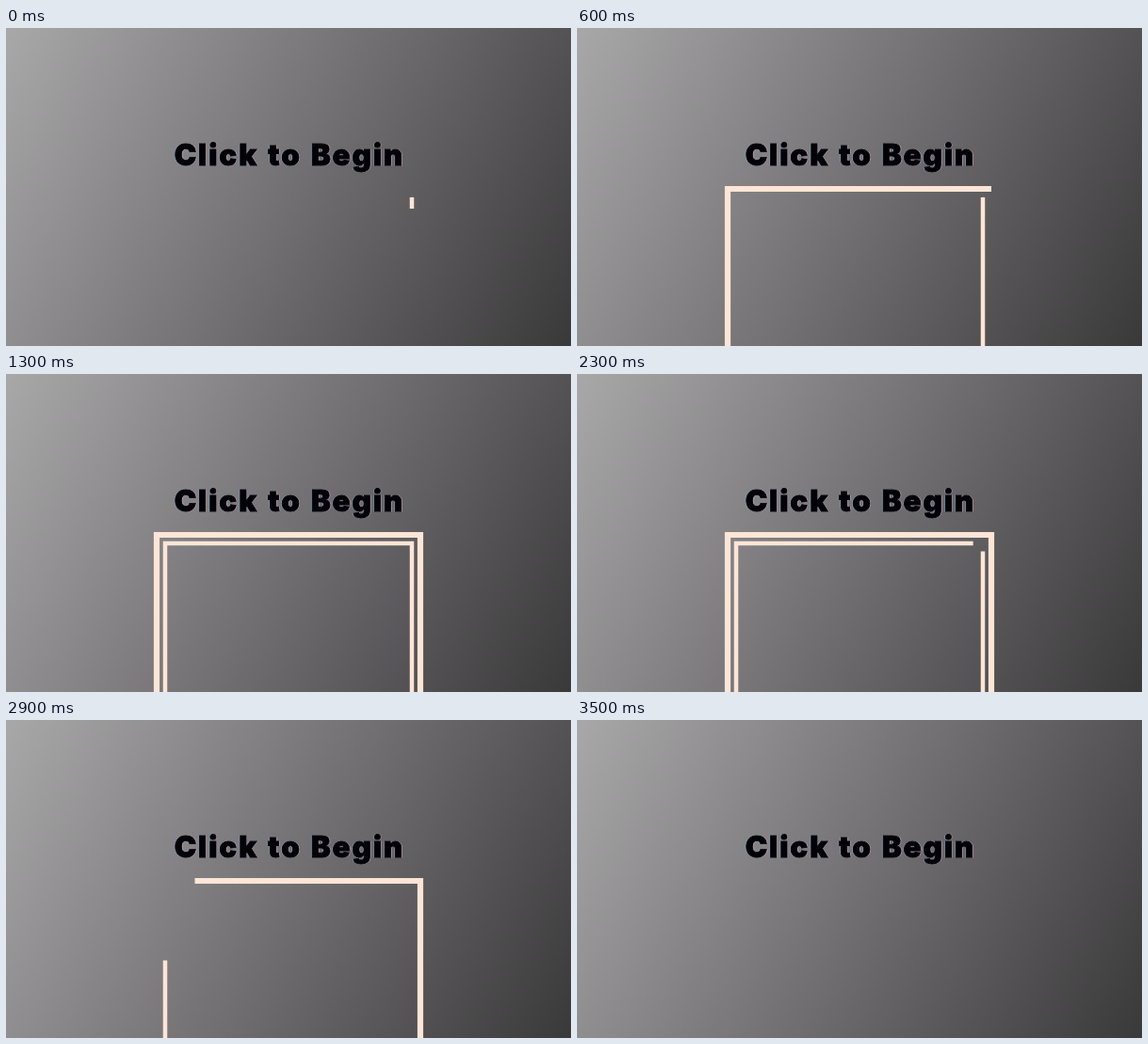
Recreate the animation shown at these times as an HTML page with a canvas. Size 600 by 338 pixels, loop 3800 ms.

```html
<!DOCTYPE html>
<html lang="en">
<head>
<meta charset="utf-8">
<title>Click to Begin</title>
<style>
  html, body { margin: 0; width: 100%; height: 100%; overflow: hidden; background: #666; }
  canvas { display: block; width: 100vw; height: 100vh; }
</style>
</head>
<body>
<canvas id="stage" width="600" height="338"></canvas>
<script>
const W = 600, H = 338, LOOP = 3800, STEP = 100;
const ctx = document.getElementById('stage').getContext('2d');

const sky = ctx.createLinearGradient(0, 0, 609, 324);
sky.addColorStop(0, '#a9a8a9');
sky.addColorStop(0.5, '#727072');
sky.addColorStop(1, '#3a393a');

// Each frame grows along its outline, then shrinks from both ends.
// tail and head are the distances the two ends travel while shrinking.
const outer = {
  pts: [[160, 356], [160, 171], [440, 171], [440, 356]],
  width: 6.2, tail: 478, head: 452,
  grow: [-80, 1360], shrink: [2430, 975]
};
const inner = {
  pts: [[431, 180], [431, 393], [169, 393], [169, 180]],
  width: 4.5, tail: 358, head: 430,
  grow: [-98, 1368], shrink: [2200, 1010]
};

function ease(t, [start, span]) {
  const u = Math.min(1, Math.max(0, (t - start) / span));
  return (1 - Math.cos(Math.PI * u)) / 2;
}

function perimeter(pts) {
  return pts.reduce((sum, [x, y], i) => {
    const [nx, ny] = pts[(i + 1) % pts.length];
    return sum + Math.hypot(nx - x, ny - y);
  }, 0);
}

function drawFrame(f, t) {
  const total = perimeter(f.pts);
  const gone = ease(t, f.shrink);
  if (gone >= 1) return;
  const from = f.tail * gone;
  const to = total * ease(t, f.grow) - f.head * gone;
  if (to <= from) return;

  ctx.beginPath();
  f.pts.forEach(([x, y]) => ctx.lineTo(x, y));
  ctx.closePath();
  ctx.lineWidth = f.width;
  ctx.strokeStyle = '#fee5d6';
  const whole = to - from >= total - 0.01;
  ctx.setLineDash(whole ? [] : [to - from, total * 2]);
  ctx.lineDashOffset = -from;
  ctx.stroke();
  ctx.setLineDash([]);
}

function drawTitle() {
  ctx.font = '900 31.5px Inter, "Liberation Sans", sans-serif';
  ctx.letterSpacing = '1.8px';
  ctx.wordSpacing = '2px';
  ctx.textAlign = 'center';
  ctx.lineWidth = 0.8;
  const put = (dx, color) => {
    ctx.fillStyle = ctx.strokeStyle = color;
    ctx.fillText('Click to Begin', 300.9 + dx, 146);
    ctx.strokeText('Click to Begin', 300.9 + dx, 146);
  };
  put(-0.9, 'rgba(125, 170, 195, 0.5)');
  put(0.9, 'rgba(205, 165, 190, 0.5)');
  put(0, '#030207');
}

function render(now) {
  const t = Math.floor((now % LOOP) / STEP) * STEP;
  ctx.fillStyle = sky;
  ctx.fillRect(0, 0, W, H);
  drawFrame(outer, t);
  drawFrame(inner, t);
  drawTitle();
}

let start;
function tick(now) {
  if (start === undefined) start = now;
  render(now - start);
  requestAnimationFrame(tick);
}
render(0);
requestAnimationFrame(tick);
</script>
</body>
</html>
```
